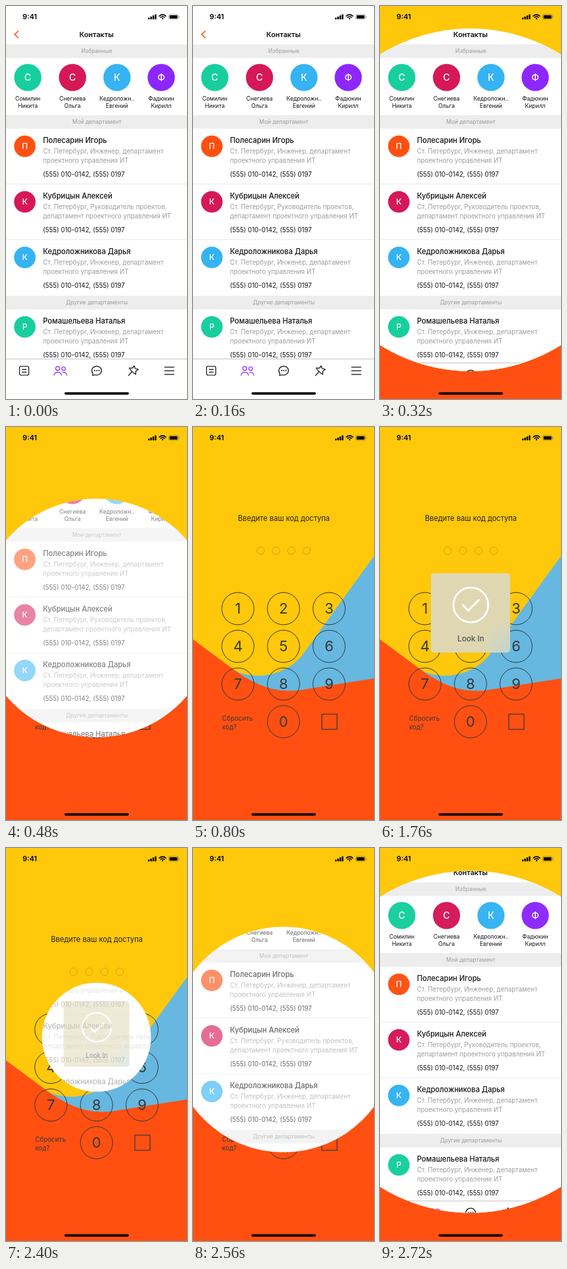
Recreate the animation shown at these times as an HTML page. Size 274 by 594 pixels, loop 2.88 s.

```html
<!DOCTYPE html>
<html lang="ru">
<head>
<meta charset="utf-8">
<title>Контакты</title>
<style>
  html, body { margin: 0; width: 100%; height: 100%; overflow: hidden; background: #ffc80a; }
  svg { display: block; width: 100%; height: 100%; }
  text { font-family: Inter, Roboto, sans-serif; }
</style>
</head>
<body>
<svg id="stage" viewBox="0 0 274 594" xmlns="http://www.w3.org/2000/svg"></svg>
<script>
const LOOP = 2880, STEP = 160;
const INK = '#111', GREY = '#9c9c9c', KEY = '#35383a';
const TEAL = '#17cf9e', CRIMSON = '#d61857', SKY = '#35b3f2', VIOLET = '#8c27ff', ORANGE = '#ff5012';
const stage = document.getElementById('stage');

// y is the visual middle of the line
const text = (s, x, y, size, fill = INK, weight = 400, anchor = 'start') =>
  `<text x="${x}" y="${y + size * 0.36}" font-size="${size}" fill="${fill}" font-weight="${weight}" text-anchor="${anchor}">${s}</text>`;
const mid = (s, x, y, size, fill, weight) => text(s, x, y, size, fill, weight, 'middle');
const rect = (x, y, w, h, fill, rx = 0) =>
  `<rect x="${x}" y="${y}" width="${w}" height="${h}" rx="${rx}" fill="${fill}"/>`;
const disc = (x, y, r, fill) => `<circle cx="${x}" cy="${y}" r="${r}" fill="${fill}"/>`;
const ring = (x, y, r, color, w = 1) =>
  `<circle cx="${x}" cy="${y}" r="${r}" fill="none" stroke="${color}" stroke-width="${w}"/>`;
const line = (d, color = INK, w = 1.2) =>
  `<path d="${d}" fill="none" stroke="${color}" stroke-width="${w}" stroke-linecap="round" stroke-linejoin="round"/>`;

const band = (y, label) => rect(0, y, 274, 20.5, '#ededed') + mid(label, 137.5, y + 10.3, 8.5, GREY);

function favourite(x, color, last, first) {
  return disc(x, 108, 20.6, color) + mid(last[0], x, 108, 14, '#fff', 500) +
    mid(last, x, 140, 8.6) + mid(first, x, 151, 8.6);
}

function person(y, color, name, role, unit) {
  return disc(28.5, y + 9, 16.3, color) + mid(name[0], 28.5, y + 9, 12, '#fff', 500) +
    text(name, 56, y, 11.1, INK, 500) +
    text(role, 56, y + 17, 9.7, GREY) +
    text(unit, 56, y + 30.3, 9.7, GREY) +
    text('(555) 010-0142, (555) 0197', 56, y + 52, 9.7);
}

function passcode() {
  let s = rect(0, 0, 274, 594, '#ffc80a') +
    '<path d="M274 195L166 344C148 367 115 381 80 374Q70 372 62 367L80 410H274Z" fill="#66b8e0"/>' +
    `<path d="M0 321L62 367C95 390 122 402 160 398L274 380V594H0Z" fill="${ORANGE}"/>` +
    mid('Введите ваш код доступа', 137.5, 138.5, 11.1, '#222');
  for (let i = 0; i < 4; i++) s += ring(102.4 + i * 23.3, 187, 5.6, '#d6a60c');
  for (let n = 1; n <= 10; n++) {
    const i = n === 10 ? 10 : n - 1;
    const x = 68 + i % 3 * 69, y = 274.5 + Math.floor(i / 3) * 57;
    s += ring(x, y, 24.4, KEY) + mid(n % 10, x, y, 22, KEY);
  }
  return s + text('Сбросить', 44, 440, 9.8, KEY) + text('код?', 44, 453, 9.8, KEY) +
    `<rect x="195" y="434" width="23" height="23" fill="none" stroke="${KEY}" stroke-width="1.2"/>`;
}

function contacts() {
  const engineer = 'Ст. Петербург, Инженер, департамент', unit = 'проектного управления ИТ';
  return line('M18.3 38L13 43L18.3 48', ORANGE, 1.7) +
    mid('Контакты', 137, 43, 10.8, INK, 600) +
    band(58, 'Избранные') +
    favourite(33, TEAL, 'Сомилин', 'Никита') +
    favourite(100.7, CRIMSON, 'Снегиева', 'Ольга') +
    favourite(168, SKY, 'Кедроложн..', 'Евгений') +
    favourite(235, VIOLET, 'Фадюкин', 'Кирилл') +
    band(165, 'Мой департамент') +
    person(203, ORANGE, 'Полесарин Игорь', engineer, unit) +
    rect(0, 268.5, 274, 1, '#e8e8e8') +
    person(287, CRIMSON, 'Кубрицын Алексей', 'Ст. Петербург, Руководитель проектов,', 'департамент ' + unit) +
    rect(0, 352.5, 274, 1, '#e8e8e8') +
    person(371, SKY, 'Кедроложникова Дарья', engineer, unit) +
    band(438, 'Другие департаменты') +
    person(476, TEAL, 'Ромашельева Наталья', engineer, unit);
}

function tabs() {
  return rect(0, 533, 274, 90, '#fff') + rect(0, 533, 274, 1, '#c4c4c4') +
    line('M23 544.5H32Q34.5 544.5 34.5 547V555.5Q34.5 558 32 558H23Q20.5 558 20.5 555.5V547Q20.5 544.5 23 544.5M24.5 549.3H30.5M24.5 553.3H30.5') +
    ring(78.3, 547.8, 3, VIOLET, 1.2) + ring(87.2, 548.2, 2.7, VIOLET, 1.2) +
    line('M72.8 558.2C73.5 552 83.2 552 84 558.2M85.5 554C88.5 553 91.5 554.5 92 558.2', VIOLET) +
    line('M131.5 555.3A7.3 6.7 0 1 1 135 557.5L131 558.3Z') +
    [134.3, 137.5, 140.7].map(x => disc(x, 551, 1, INK)).join('') +
    line('M194 544L195.6 548L200.2 549.2L196.5 552L196.5 556.8L192.4 553.9L189.3 550.8L186.4 547L191.2 547.3ZM190.7 552.5L185.5 558.7') +
    line('M240 545.8H254.3M240 551.3H254.3M240 556.8H254.3');
}

function statusBar() {
  return text('9:41', 25, 16.2, 10.9, '#000', 600) +
    [0, 1, 2, 3].map(i => rect(215 + i * 3.4, 17.6 - i * 1.7, 2.4, 2.6 + i * 1.7, '#000', 0.6)).join('') +
    line('M232 15.2A7 7 0 0 1 242 15.2M234 17.2A4.2 4.2 0 0 1 240 17.2', '#000', 1.6) + disc(237, 19, 1.2, '#000') +
    '<rect x="246.5" y="12.7" width="14.2" height="7.4" rx="2" fill="none" stroke="#000" stroke-opacity=".4" stroke-width=".8"/>' +
    rect(247.7, 13.9, 11.8, 5, '#000', 1) + rect(261.6, 15.2, 0.9, 2.6, '#777', 0.4) +
    rect(88.5, 583.8, 97.5, 3.6, '#000', 1.8);
}

stage.innerHTML = `
  <defs>
    <clipPath id="reveal"><circle id="hole" cx="137" cy="297" r="400"/></clipPath>
    <radialGradient id="glass" gradientUnits="userSpaceOnUse" cx="200" cy="338" r="48">
      <stop offset="0" stop-color="#bed3cf"/><stop offset=".45" stop-color="#cfd6c2"/><stop offset="1" stop-color="#dfd7b2"/>
    </radialGradient>
  </defs>
  ${passcode()}
  <g clip-path="url(#reveal)">
    ${rect(0, 0, 274, 594, '#fff')}
    <g id="page"><g id="list">${contacts()}</g><g id="tabs">${tabs()}</g></g>
  </g>
  <g id="popup">
    ${rect(77, 221, 120, 120, 'url(#glass)', 5)}
    <g id="scan"><rect x="115" y="247" width="44" height="44" fill="none" stroke="#fff" stroke-width="2.6"/></g>
    <g id="done">${ring(137.5, 269, 26.3, '#fff', 2.8)}${line('M125.5 269.5L133.5 277.5L149.5 261.5', '#fff', 3)}</g>
    ${mid('Look In', 137.5, 320, 11.6, '#4a5254', 500)}
  </g>
  ${statusBar()}`;

const el = id => document.getElementById(id);
const [hole, page, list, tabBar, popup, scan, done] =
  ['hole', 'page', 'list', 'tabs', 'popup', 'scan', 'done'].map(el);
const clamp = v => Math.max(0, Math.min(1, v));
const show = (node, on) => node.setAttribute('display', on ? 'inline' : 'none');

function draw(time) {
  const t = Math.floor(time % LOOP / STEP) * STEP;

  let r = 0, cy = 286, shift = 0, fade = 1, drop = 0;
  if (t < 800) {
    const out = Math.max(0, t - 320);
    r = 416 - t * 0.4906;
    cy = 293 - out * 0.0262;
    shift = -out * 0.075;
    fade = clamp(1 - out / 340);
    drop = Math.max(0, t - 160) * 0.0375;
  } else if (t >= 2400) {
    const k = (t - 2400) / STEP;
    r = 82.5 + 88 * k;
    cy = 286 + 3.5 * k;
    shift = -18 + 6 * k;
    fade = 0.28 + 0.35 * k;
  }
  hole.setAttribute('r', r);
  hole.setAttribute('cy', cy);
  page.setAttribute('opacity', fade);
  list.setAttribute('transform', `translate(0 ${shift})`);
  tabBar.setAttribute('transform', `translate(0 ${drop})`);

  const k = Math.min(clamp((t - 960) / 320), clamp((2560 - t) / 320));
  const scale = 0.66 + 0.34 * k;
  popup.setAttribute('opacity', k);
  popup.setAttribute('transform', `translate(137 281) scale(${scale}) translate(-137 -281)`);
  show(scan, t < 1760);
  show(done, t >= 1760);
}

const start = performance.now();
function tick() {
  draw(performance.now() - start);
  requestAnimationFrame(tick);
}
tick();
</script>
</body>
</html>
```
